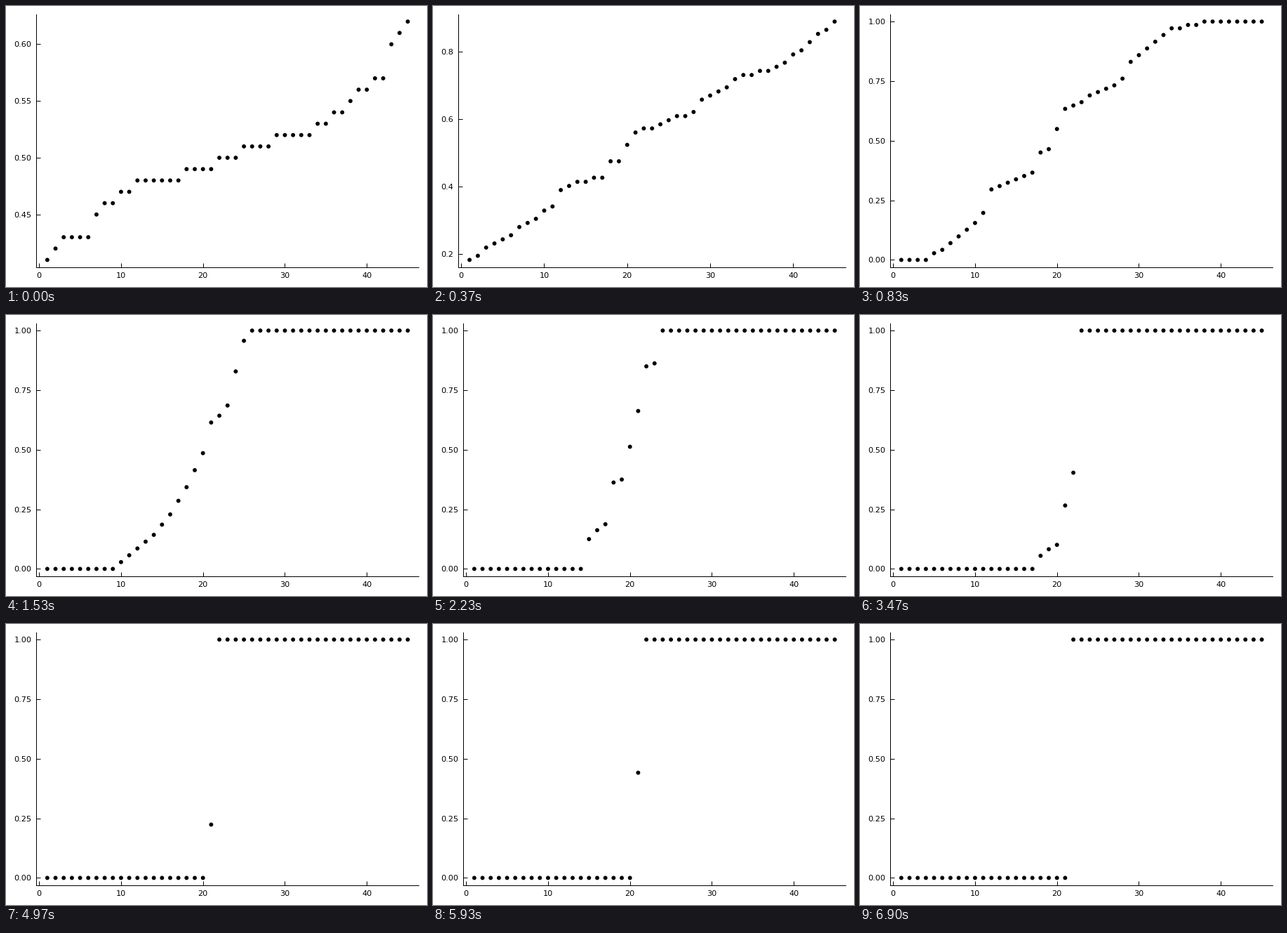
These frames come from a looping animation (600x400 px, 8 s). A matplotlib script:

```python
import numpy as np
import matplotlib.pyplot as plt
from matplotlib.animation import FuncAnimation

W, H, DPI = 600, 400, 100
PX = 72 / DPI
COUNT, FRAMES, LAST_STEP = 45, 240, 207
TOP, BOTTOM, RIGHT = 12, 371.6, 588
rank = np.arange(1, COUNT + 1)

# key steps, each with the corner points (rank, share) of the sorted curve
KEYS = [
    (0, [(1, .41), (3, .43), (6, .43), (7, .45), (12, .478), (17, .4847),
         (29, .5153), (33, .5223), (42, .5727), (43, .6), (45, .62)]),
    (24, [(4, 0), (9, .12), (11, .197), (12, .296), (17, .366), (18, .45),
          (19, .465), (21, .634), (28, .755), (29, .831), (34, .968), (38, 1)]),
    (45, [(9, 0), (15, .18), (18, .345), (20, .487), (21, .608), (23, .689),
          (25, .96), (26, 1)]),
    (66, [(14, 0), (15, .125), (17, .188), (18, .363), (19, .375), (21, .662),
          (22, .85), (23, .862), (24, 1)]),
    (104, [(17, 0), (18, .056), (20, .103), (21, .262), (22, .402), (23, 1)]),
    (125, [(20, 0), (21, .33), (22, .8), (23, 1)]),
]
# the last undecided dot swings before it settles
KEYS += [(step, [(20, 0), (21, share), (22, 1)])
         for step, share in ((144, .14), (169, .56), (LAST_STEP, 0))]


def curve(points):
    """Share per rank; settled ranks run past 0 and 1 so they arrive early."""
    x, y = zip(*points)
    return np.interp(rank, x, y) + 0.03 * (rank - np.clip(rank, x[0], x[-1]))


steps = [step for step, _ in KEYS]
paths = np.array([curve(points) for _, points in KEYS]).T


def values(step):
    # shares are whole votes: one joins per step while the first ones fade out
    votes = round(step + 2 + 98 * np.exp(-step / 31))
    v = np.clip([np.interp(step, steps, p) for p in paths], 0, 1)
    return np.sort(np.round(v * votes) / votes)


def tick_step(span):
    for limit, size in ((0.35, 0.05), (0.65, 0.1), (0.85, 0.2)):
        if span < limit:
            return size
    return 0.25


fig = plt.figure(figsize=(W / DPI, H / DPI), dpi=DPI, facecolor="white")
ax = fig.add_axes([0, 0, 1, 1])
ax.spines[["top", "right"]].set_visible(False)
ax.spines[["left", "bottom"]].set_linewidth(PX)
ax.tick_params(direction="in", length=6 * PX, width=PX, labelsize=11.3 * PX,
               labelfontfamily="DejaVu Sans")
ax.tick_params(axis="both", pad=7 * PX)
ax.set_xlim(1 - 0.03 * (COUNT - 1), COUNT + 0.03 * (COUNT - 1))
ax.set_xticks(range(0, 41, 10))
# one colour per dot keeps sub-pixel placement
dots = ax.scatter(rank, values(0), s=(5.9 * PX) ** 2, c=["black"] * COUNT,
                  linewidths=0, zorder=3)


def draw(frame):
    v = values(min(frame, LAST_STEP))
    pad = 0.03 * (v[-1] - v[0])
    low, high = v[0] - pad, v[-1] + pad
    size = tick_step(v[-1] - v[0])
    digits = 1 if size in (0.1, 0.2) else 2
    ticks = np.arange(np.ceil(low / size), np.floor(high / size) + 1) * size + 0.0

    # shorter labels leave more room for the plot
    left = 43.45 if digits == 2 else 36.45
    ax.set_position([left / W, 1 - BOTTOM / H, (RIGHT - left) / W, (BOTTOM - TOP) / H])
    ax.set_yticks(ticks, [f"{t:.{digits}f}" for t in ticks])
    ax.set_ylim(low, high)
    dots.set_offsets(np.column_stack([rank, v]))
    return [dots]


anim = FuncAnimation(fig, draw, frames=FRAMES, interval=8000 / FRAMES,
                     repeat=True, repeat_delay=0, blit=False)
plt.show()
```
